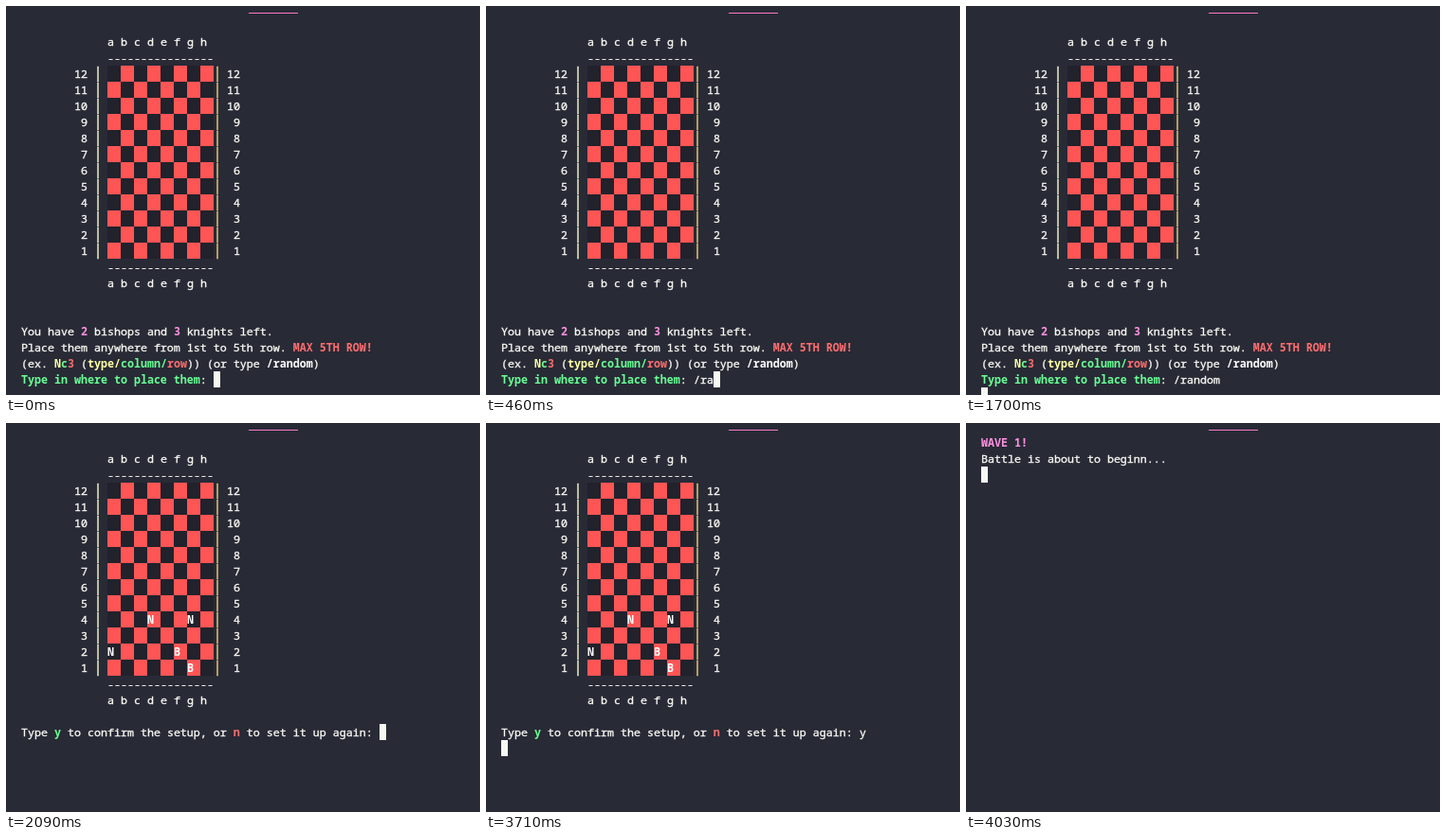
Recreate the animation shown at these times as an HTML page. Size 500 by 411 pixels, loop 4880 ms.

```html
<!DOCTYPE html>
<html lang="en">
<head>
<meta charset="utf-8">
<title>Board setup</title>
<style>
  html, body { margin: 0; width: 100%; height: 100%; overflow: hidden; background: #282a36; }
  #term {
    position: relative; width: 500px; height: 411px; overflow: hidden;
    background: #282a36; color: #f8f8f2;
    font: 11.6667px/17px "Noto Sans Mono", "DejaVu Sans Mono", monospace;
    font-variant-ligatures: none;
    -webkit-text-stroke: 0.35px currentColor;
  }
  /* Everything sits on a character grid: 7 by 17 px, origin at 16,12 */
  pre, .squares, .cursor {
    position: absolute; margin: 0; font: inherit;
    left: calc(16px + 7px * var(--c, 0));
    top: calc(12px + 17px * var(--l, 0));
  }
  b { font-weight: 700; color: #fff; -webkit-text-stroke: 0; }
  .g { color: #69ff94; }
  .r { color: #ff6e6e; }
  .y { color: #ffffa5; }
  .p { color: #ff92df; }
  .tab { position: absolute; left: 256px; top: 7px; width: 52px; height: 1px; background: #ff79c6; }
  .squares {
    width: 112px; height: 204px;
    background: conic-gradient(#f55 25%, #21222c 0 50%, #f55 0 75%, #21222c 0) 0 0 / 28px 34px;
  }
  /* Tall bars at both sides of the board */
  .bar {
    width: 7px; margin-left: -0.5px; white-space: pre-line;
    font: 15px/17px "DejaVu Sans Mono", monospace;
  }
  .left { color: #ebebc4; }
  .right { color: #e6be6c; }
  .cursor { width: 7px; height: 17px; background: #f8f8f2; }
  .typed { overflow: hidden; }

  .board, .place, .confirm, .answer, .wave, .typed, .cursor { animation: 4880ms step-end infinite; }
  .board { animation-name: board; }
  .place { animation-name: place; }
  .confirm { animation-name: confirm; }
  .answer { animation-name: answer; }
  .wave { animation-name: wave; }
  .typed { animation-name: type; }
  .cursor { animation-name: cursor; }

  @keyframes board { 0% { visibility: visible } 82.581%, 100% { visibility: hidden } }
  @keyframes place { 0% { visibility: visible } 42.827%, 100% { visibility: hidden } }
  @keyframes confirm {
    0% { visibility: hidden } 42.827% { visibility: visible } 82.581%, 100% { visibility: hidden }
  }
  @keyframes answer {
    0% { visibility: hidden } 71.311% { visibility: visible } 82.581%, 100% { visibility: hidden }
  }
  @keyframes wave { 0% { visibility: hidden } 82.581%, 100% { visibility: visible } }
  @keyframes type {
    0% { width: 0 }
    1.639% { width: 7px }
    7.786% { width: 14px }
    9.426% { width: 21px }
    12.499% { width: 28px }
    14.139% { width: 35px }
    17.213%, 100% { width: 49px }
  }
  @keyframes cursor {
    0% { left: 219px; top: 386px }
    1.639% { left: 226px; top: 386px }
    7.786% { left: 233px; top: 386px }
    9.426% { left: 240px; top: 386px }
    12.499% { left: 247px; top: 386px }
    14.139% { left: 254px; top: 386px }
    17.213% { left: 268px; top: 386px }
    34.836% { left: 16px; top: 403px }
    42.827% { left: 394px; top: 318px }
    71.311% { left: 401px; top: 318px }
    76.024% { left: 16px; top: 335px }
    82.581%, 100% { left: 16px; top: 46px }
  }
</style>
</head>
<body>
<div id="term">
  <div class="tab"></div>

  <div class="board">
    <div class="squares" style="--c:13;--l:3"></div>
    <pre style="--c:13;--l:1">a b c d e f g h
----------------</pre>
    <pre style="--c:8;--l:3">12
11
10
 9
 8
 7
 6
 5
 4
 3
 2
 1</pre>
    <pre class="bar left" style="--c:11;--l:3">| | | | | | | | | | | |</pre>
    <pre class="bar right" style="--c:29;--l:3">| | | | | | | | | | | |</pre>
    <pre style="--c:31;--l:3">12
11
10
 9
 8
 7
 6
 5
 4
 3
 2
 1</pre>
    <pre style="--c:13;--l:15">----------------
a b c d e f g h</pre>
  </div>

  <div class="place">
    <pre style="--l:19">You have <b class="p">2</b> bishops and <b class="p">3</b> knights left.
Place them anywhere from 1st to 5th row. <b class="r">MAX 5TH ROW!</b>
(ex. <b class="y">N</b><b class="g">c</b><b class="r">3</b> (<b class="y">type/</b><b class="g">column/</b><b class="r">row</b>)) (or type <b>/random</b>)
<b class="g">Type in where to place them</b>:</pre>
    <pre class="typed" style="--c:29;--l:22">/random</pre>
  </div>

  <div class="confirm">
    <pre style="--c:13;--l:11"><b>      N     N

N         B
            B</b></pre>
    <pre style="--l:18">Type <b class="g">y</b> to confirm the setup, or <b class="r">n</b> to set it up again:</pre>
  </div>
  <pre class="answer" style="--c:54;--l:18">y</pre>

  <pre class="wave"><b class="p">WAVE 1!</b>
Battle is about to beginn...</pre>

  <div class="cursor"></div>
</div>
</body>
</html>
```
